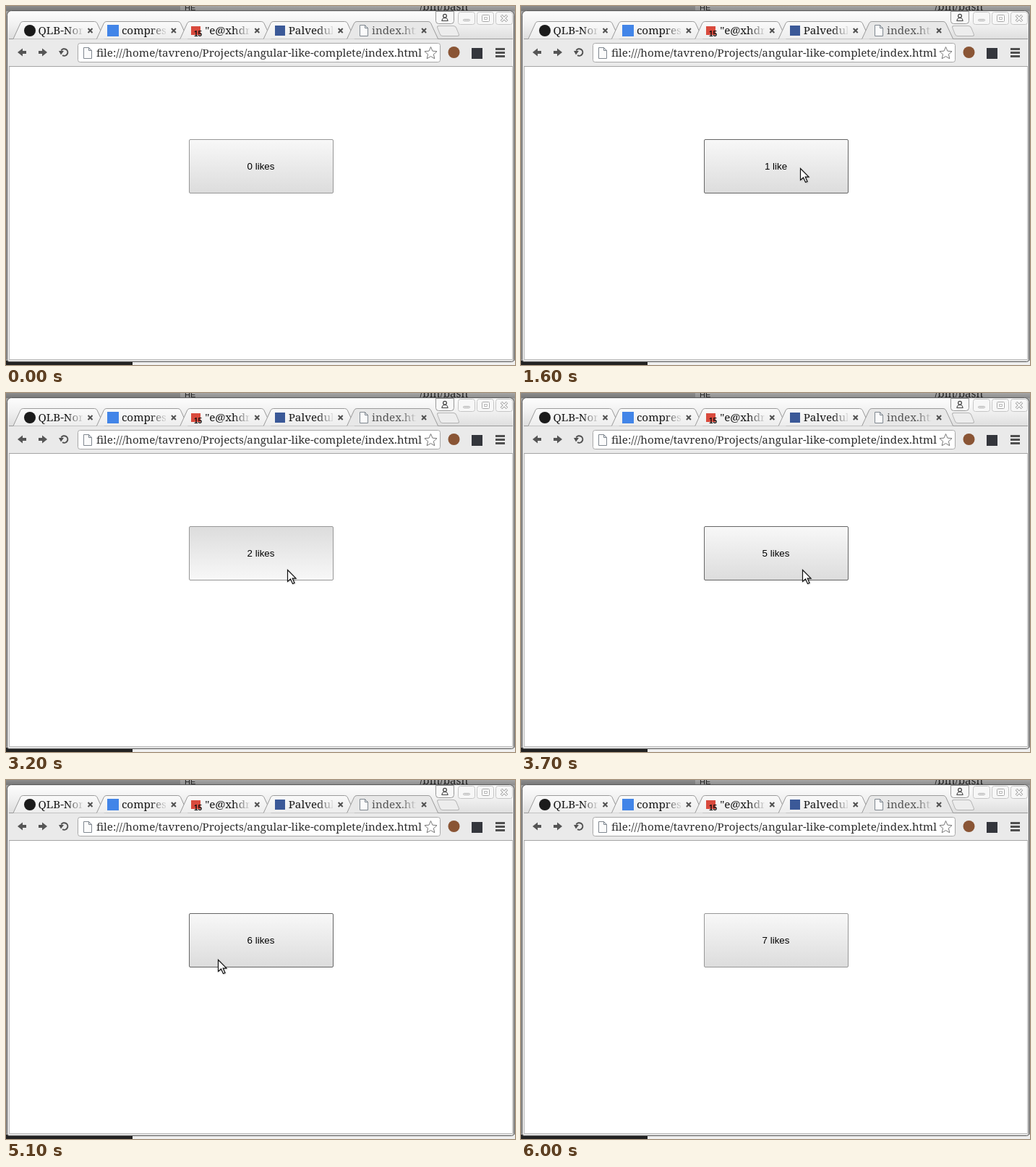
Animation of 704x496 px, one loop 6100 ms. Source, as an HTML page with a canvas:

```html
<!DOCTYPE html>
<html lang="en">
<head>
<meta charset="utf-8">
<title>Like counter</title>
<style>
html, body { margin: 0; width: 704px; height: 496px; overflow: hidden; background: #fff; }
canvas { display: block; }
</style>
</head>
<body>
<canvas id="stage" width="704" height="496"></canvas>
<script>
const ctx = document.getElementById('stage').getContext('2d');
const LOOP = 6100, STEP = 100, TRAVEL = 500, HOLD = 100;
const SANS_FAMILY = '"Liberation Sans", Arial, sans-serif';
const SERIF = '15.2px "Noto Serif", serif';
const BUTTON = { x: 253, y: 184, w: 200, h: 75 };

// The pointer reaches each place at time `at`, after moving for TRAVEL ms
const places = [
  { at: 500, x: 570, y: 500 },
  { at: 1100, x: 386, y: 224 },
  { at: 2100, x: 420, y: 218 },
  { at: 2900, x: 389, y: 244 },
  { at: 4600, x: 293, y: 248 },
  { at: 5900, x: 130, y: 500 }
];
const releases = [1500, 2400, 3300, 3500, 3700, 4900, 5400];

function vertical(y0, y1, ...colors) {
  const g = ctx.createLinearGradient(0, y0, 0, y1);
  colors.forEach((c, i) => g.addColorStop(i / (colors.length - 1), c));
  return g;
}

function rect(x, y, w, h, fill) {
  ctx.fillStyle = fill;
  ctx.fillRect(x, y, w, h);
}

function paint(fill, stroke, width = 1) {
  if (fill) { ctx.fillStyle = fill; ctx.fill(); }
  if (stroke) { ctx.strokeStyle = stroke; ctx.lineWidth = width; ctx.stroke(); }
}

function box(x, y, w, h, radius, fill, stroke) {
  ctx.beginPath();
  ctx.roundRect(x + .5, y + .5, w - 1, h - 1, radius);
  paint(fill, stroke);
}

function poly(points, fill, stroke, width) {
  ctx.beginPath();
  points.forEach(([x, y]) => ctx.lineTo(x, y));
  ctx.closePath();
  paint(fill, stroke, width);
}

function disc(x, y, r, fill, stroke, width) {
  ctx.beginPath();
  ctx.arc(x, y, r, 0, Math.PI * 2);
  paint(fill, stroke, width);
}

function text(s, x, y, font, fill, align = 'left') {
  ctx.font = font;
  ctx.fillStyle = fill;
  ctx.textAlign = align;
  ctx.fillText(s, x, y);
}

function cross(x, y, r, color, width) {
  ctx.beginPath();
  for (const side of [-1, 1]) {
    ctx.moveTo(x - r * side, y - r);
    ctx.lineTo(x + r * side, y + r);
  }
  paint(null, color, width);
}

function pageIcon(x, y, w = 11, h = 15, fold = 4) {
  const cut = [x + w - fold, y], corner = [x + w, y + fold];
  poly([[x, y], cut, corner, [x + w, y + h], [x, y + h]], '#fbfbfb', '#808890');
  poly([cut, [x + w - fold, y + fold], corner], '#e4e8ec', '#808890');
}

function drawDesktop() {
  rect(0, 0, 704, 496, '#a0a0a0');
  rect(0, 0, 704, 7, vertical(0, 7, '#a6a6a6', '#8c8c8c'));
  rect(0, 0, 241, 7, vertical(0, 7, '#8c8c8c', '#777'));
  text('HE', 247, 6, `11px ${SANS_FAMILY}`, '#222');
  text('/bin/bash', 572, 6, SERIF, '#222');
  rect(0, 490, 175, 6, '#222');
  rect(175, 490, 529, 6, '#efefef');
}

// Tab outline: sloped sides, rounded upper corners
function tabShape(x, y, w, h, slope, fill, stroke) {
  ctx.beginPath();
  ctx.moveTo(x, y + h);
  ctx.arcTo(x + slope, y, x + w / 2, y, 4);
  ctx.arcTo(x + w - slope, y, x + w, y + h, 4);
  ctx.lineTo(x + w, y + h);
  paint(fill, stroke);
}

function tabTitle(title, x, color) {
  const fade = ctx.createLinearGradient(x + 40, 0, x + 66, 0);
  fade.addColorStop(0, color);
  fade.addColorStop(1, 'rgba(120,120,120,0)');
  ctx.save();
  ctx.beginPath();
  ctx.rect(x, 22, 61, 22);
  ctx.clip();
  text(title, x, 39, SERIF, fade);
  ctx.restore();
}

function drawTabs() {
  const titles = ['QLB-Nord', 'compress', '"e@xhdru', 'Palveduk', 'index.html'];
  titles.forEach((title, i) => {
    const x = 10 + i * 115.4, active = i === 4;
    const fill = active ? '#e8e8e8' : vertical(21, 46, '#fafafa', '#ededed');
    tabShape(x, 21.5, 126, 24, 11, fill, '#9b9b9b');
    tabTitle(title, x + 34.5, active ? '#555' : '#151515');
    cross(x + 106.5, 34, 3, '#505050', 2);
  });
  disc(33, 34, 8, '#1b1b1b');
  rect(140, 26, 16, 16, '#4285e8');
  rect(256, 28, 13, 12, '#d94a3d');
  text('15', 260, 42, `bold 10px ${SANS_FAMILY}`, '#111');
  rect(372, 27, 14, 14, '#3b5998');
  pageIcon(489.5, 26.5);

  // New-tab button is a slanted rectangle
  ctx.save();
  ctx.transform(1, 0, .4, 1, 595, 27);
  box(0, 0, 27, 15, 3, '#ededed', '#b5b5b5');
  ctx.restore();
}

function drawWindowButtons() {
  box(594, 7, 26, 18, [0, 0, 4, 4], '#f8f8f8', '#999');
  disc(607, 13.8, 2.4, null, '#444', 1.2);
  ctx.beginPath();
  ctx.arc(607, 20.5, 4, Math.PI, 0);
  ctx.closePath();
  paint('#f8f8f8', '#444', 1.2);

  for (const x of [625, 651, 677]) box(x, 8, 24, 18, 3, '#f7f7f7', '#c6c6c6');
  box(632, 18, 10, 3, 1, '#fff', '#a8a8a8');
  box(658, 12, 11, 10, 1, '#fff', '#a8a8a8');
  box(661, 15, 5, 4, 0, '#fff', '#b4b4b4');
  cross(689, 17, 4, '#a0a0a0', 3.6);
  cross(689, 17, 3.6, '#fff', 1.6);
}

function arrow(x, dir) {
  poly([[x, 64], [x + 7 * dir, 58.5], [x + 7 * dir, 69.5]], '#555');
  rect(Math.min(x + 6 * dir, x + 12 * dir), 62, 6, 4, '#555');
}

function drawToolbar() {
  rect(4, 46, 697, 37, '#eaeaea');
  rect(4, 83, 697, 1, '#a5a5a5');
  arrow(16, 1);
  arrow(57, -1);

  ctx.beginPath();
  ctx.arc(80.5, 64, 4.8, -2.6, 2.1);
  paint(null, '#505050', 2);
  poly([[73, 62], [80, 62], [76, 67.5]], '#505050');

  box(99, 51, 502, 27, 3, '#fff', '#a8a8a8');
  pageIcon(107.5, 57.5);
  text('file:///home/tavreno/Projects/angular-like-complete/index.html', 125, 70, SERIF, '#2e2e2e');

  const star = Array.from({ length: 10 }, (_, i) => {
    const a = -Math.PI / 2 + i * Math.PI / 5, r = i % 2 ? 4.1 : 9;
    return [587.5 + r * Math.cos(a), 65.5 + r * Math.sin(a)];
  });
  poly(star, '#fff', '#777');

  disc(619.5, 64, 8, '#8a5535');
  rect(644, 58, 15, 15, '#34363c');
  for (let y = 58; y < 70; y += 5) rect(677, y, 13, 3, '#505050');
}

function drawWindow() {
  box(1, 6, 702, 486, [6, 6, 3, 3], '#e2e2e2', '#5a5a5a');
  box(2, 7, 700, 39, [5, 5, 0, 0], vertical(7, 46, '#fdfdfd', '#f0f0f0', '#dedede'));
  rect(4, 45, 697, 1, '#9b9b9b');
  drawTabs();
  drawWindowButtons();
  drawToolbar();
  rect(4, 84, 697, 405, '#bdbdbd');
  rect(5, 84, 695, 404, '#fff');
}

function pointerAt(t) {
  const next = places.findIndex(place => place.at > t);
  if (next < 1) return null;
  const from = places[next - 1], to = places[next];
  const u = Math.max(0, 1 - (to.at - t) / TRAVEL);
  const ease = u * u * (3 - 2 * u);
  const mix = (a, b) => Math.round(a + (b - a) * ease);
  return { x: mix(from.x, to.x), y: mix(from.y, to.y) };
}

function drawButton(t, pointer) {
  const { x, y, w, h } = BUTTON;
  const likes = releases.filter(up => t >= up).length;
  const pressed = releases.some(up => t >= up - HOLD && t < up);
  const hover = pointer && pointer.x >= x && pointer.x < x + w && pointer.y >= y && pointer.y < y + h;
  const shades = pressed ? ['#dcdcdc', '#f8f8f8'] : ['#f8f8f8', '#dcdcdc'];
  box(x, y, w, h, 1.5, vertical(y, y + h, ...shades), hover && !pressed ? '#666' : '#979797');
  text(`${likes} like${likes === 1 ? '' : 's'}`, x + w / 2 - .5, 226, `13.33px ${SANS_FAMILY}`, '#000', 'center');
}

function drawPointer({ x, y }) {
  const shape = new Path2D('M0 0V16L4 12.5L7 19L9.5 18L6.7 11.7H11.5Z');
  ctx.save();
  ctx.translate(x + .5, y + .5);
  ctx.shadowColor = 'rgba(0,0,0,.35)';
  ctx.shadowBlur = 2;
  ctx.shadowOffsetX = ctx.shadowOffsetY = 1;
  ctx.fillStyle = '#fff';
  ctx.fill(shape);
  ctx.shadowColor = 'transparent';
  ctx.strokeStyle = '#111';
  ctx.lineWidth = 1.2;
  ctx.stroke(shape);
  ctx.restore();
}

function render(now) {
  const t = Math.floor((now % LOOP) / STEP) * STEP;
  const pointer = pointerAt(t);
  drawDesktop();
  drawWindow();
  drawButton(t, pointer);
  if (pointer) drawPointer(pointer);
  requestAnimationFrame(render);
}

requestAnimationFrame(render);
</script>
</body>
</html>
```
